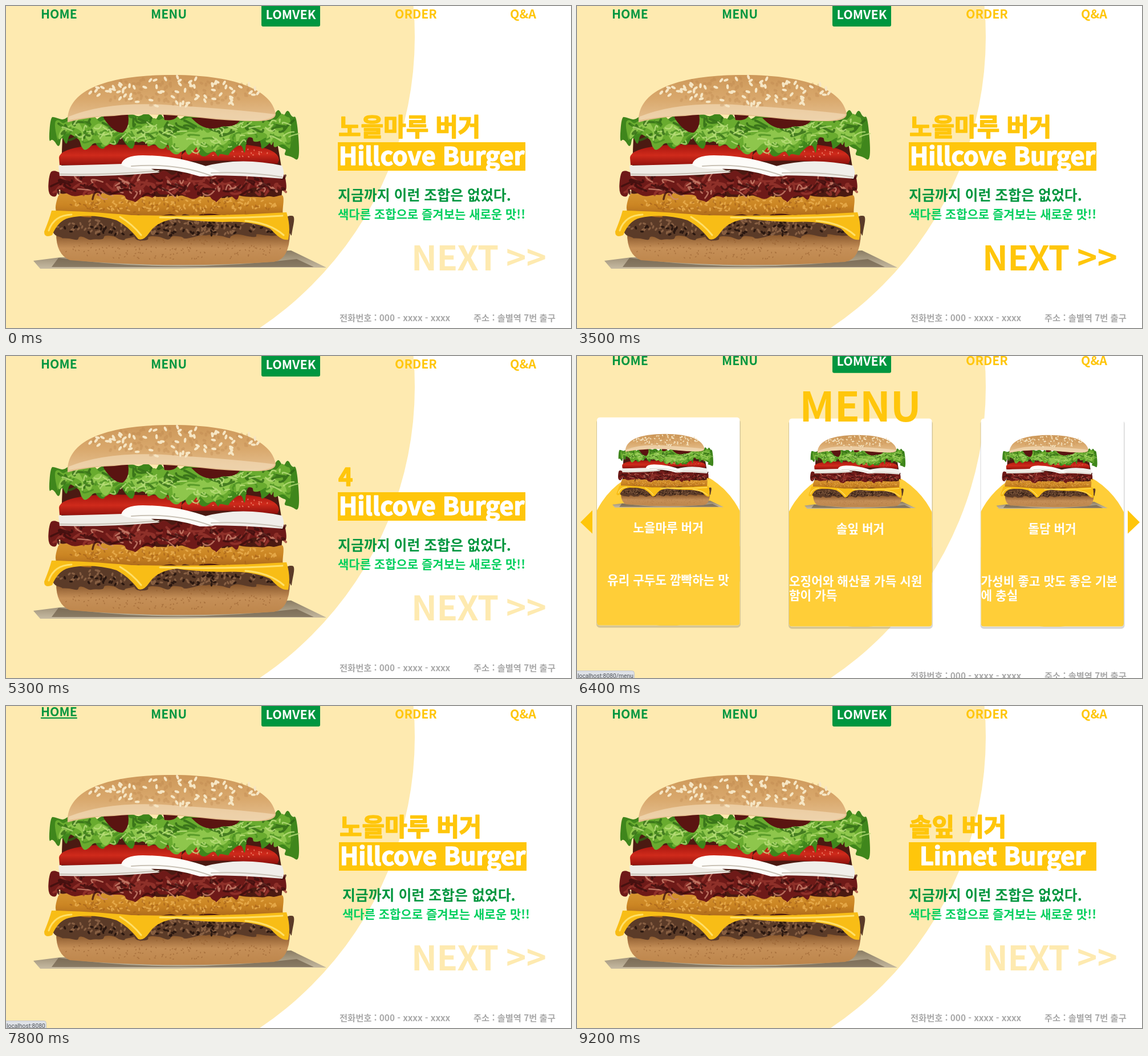
An HTML page for the animation above (9.9 s loop, 991 px wide and 565 px high).

```html
<!DOCTYPE html>
<html lang="ko">
<head>
<meta charset="utf-8">
<style>
html, body { margin: 0; width: 100%; height: 100%; overflow: hidden; background: #fff; }
svg { display: block; width: 991px; height: 565px; }
text { font-family: "Noto Sans CJK KR", "Noto Sans CJK JP", "Noto Sans CJK", sans-serif; font-weight: 700; white-space: pre; }
.nav { font-size: 21.3px; }
.title { font-size: 43px; font-weight: 900; stroke-width: 1.6px; stroke-linejoin: round; }
.gold { fill: #ffc60b; stroke: #ffc60b; }
.white { fill: #fff; stroke: #fff; }
.foot { font-size: 15.3px; font-weight: 500; fill: #a9a9a9; }
.card { font-size: 21.3px; fill: #fff; }
.tip { font: 10.3px Roboto, "Open Sans", sans-serif; fill: #50545a; }
</style>
</head>
<body>
<svg id="stage" viewBox="0 0 991 565"></svg>
<script>
const GREEN = '#00963f', GOLD = '#ffc60b', PALE = '#feeab0', LOOP = 9900;

let seed = 11;
const rnd = () => (seed = seed * 16807 % 2147483647) / 2147483647;
const spread = n => (rnd() - .5) * n;
const path = (d, fill, more = '') => `<path d="${d}" fill="${fill}" ${more}/>`;
const line = (d, color, width) => path(d, 'none', `stroke="${color}" stroke-width="${width}" stroke-linecap="round"`);
const text = (x, y, s, more = '') => `<text x="${x}" y="${y}" ${more}>${s}</text>`;
const grad = (id, ...colors) => `<linearGradient id="${id}" x2="0" y2="1">${colors.map((c, i) =>
  `<stop offset="${i / (colors.length - 1)}" stop-color="${c}"/>`).join('')}</linearGradient>`;

// Smooth closed outline through the midpoints of a point list
const blob = pts => {
  const mid = i => {
    const a = pts[i], b = pts[(i + 1) % pts.length];
    return `${((a[0] + b[0]) / 2).toFixed(1)} ${((a[1] + b[1]) / 2).toFixed(1)}`;
  };
  return `M${mid(pts.length - 1)}` + pts.map((p, i) => `Q${p[0].toFixed(1)} ${p[1].toFixed(1)} ${mid(i)}`).join('') + 'Z';
};

// Band with ragged edges between two curves
const ruffle = (x0, x1, top, bottom, amp, step = 9) => {
  const a = [], b = [];
  for (let x = x0; x <= x1; x += step) {
    a.push([x, top(x) + spread(amp)]);
    b.unshift([x + spread(step * 2), bottom(x) + spread(amp * 1.6)]);
  }
  return blob([...a, ...b]);
};

// Small ellipses scattered inside a larger one
const specks = (n, cx, cy, rx, ry, fill, w, h, o = 1) => {
  let out = '';
  while (n--) {
    const a = rnd() * 6.283, r = Math.sqrt(rnd());
    const x = cx + rx * r * Math.cos(a), y = cy + ry * r * Math.sin(a);
    out += `<ellipse rx="${w}" ry="${h}" transform="translate(${x.toFixed(1)} ${y.toFixed(1)}) rotate(${(rnd() * 180) | 0})"/>`;
  }
  return `<g fill="${fill}" opacity="${o}">${out}</g>`;
};

// Short random curved strokes
const curls = (n, x0, x1, top, bottom, len, color, w) => {
  let d = '';
  while (n--) {
    const x = x0 + rnd() * (x1 - x0), y = top(x) + rnd() * (bottom(x) - top(x));
    d += `M${x.toFixed(1)} ${y.toFixed(1)}q${spread(len).toFixed(1)} ${spread(len).toFixed(1)} ${spread(len * 2).toFixed(1)} ${spread(len).toFixed(1)}`;
  }
  return `<g opacity=".75">${line(d, color, w)}</g>`;
};

const lettuce = (x0, x1, top, bottom) => {
  const at = k => x => top(x) + (bottom(x) - top(x)) * k;
  return path(ruffle(x0, x1, top, bottom, 19, 8), '#3f861c')
    + path(ruffle(x0 + 6, x1 - 6, at(.1), at(.92), 17, 8), '#69ab2f')
    + path(ruffle(x0 + 14, x1 - 14, at(.42), at(.8), 20), '#8ec64c')
    + curls(45, x0 + 12, x1 - 12, at(.05), at(.6), 24, '#2d6513', 4)
    + curls(40, x0 + 12, x1 - 12, at(.3), at(.95), 20, '#478c1f', 3)
    + curls(65, x0 + 12, x1 - 12, at(.25), at(.95), 19, '#bfe281', 2.4);
};

const tallBurger = () =>
  path('M48 447L95 441 500 429 562 459Q420 458 300 461L60 461Z', 'url(#paper)')
  + path('M92 442Q290 470 510 444L540 458 80 458Z', '#5b4c38', 'opacity=".55"')
  + path('M100 205H470L486 300 478 405H92Z', '#4b1a12')
  + path('M88 396Q87 436 112 446Q290 461 470 449Q497 445 498 398Z', 'url(#base)')
  + specks(140, 293, 428, 190, 18, '#8d5527', 1.6, .9, .45)
  + path(ruffle(84, 508, () => 368, x => 403 + 4 * Math.sin(x / 130), 7), '#5b3b28')
  + specks(150, 295, 387, 205, 15, '#93694a', 3.2, 1.7, .8)
  + specks(80, 295, 391, 205, 13, '#2a1811', 3.2, 1.8)
  + path(ruffle(92, 492, x => 332 - 3 * Math.sin(x / 80), () => 368, 6), 'url(#fried)')
  + specks(120, 292, 347, 192, 14, '#efb556', 3.2, 1.5, .7)
  + specks(80, 292, 352, 192, 13, '#a5611a', 2.7, 1.3, .65)
  + path('M80 359Q140 360 220 367Q360 370 492 362Q500 388 495 410Q483 413 464 391Q430 376 380 379Q320 377 300 373Q265 377 252 397Q241 413 232 409Q214 386 194 376Q150 363 110 372Q91 377 81 402Q67 408 67 396Q76 374 80 359Z', '#f8bd16')
  + line('M75 394Q84 367 115 366M200 370Q222 383 237 402M420 377Q462 380 487 402M270 371Q390 374 485 368', '#ffe06a', 3)
  + path(ruffle(76, 494, () => 294, x => 332 + 5 * Math.sin(x / 26), 13), '#6e1a18')
  + curls(55, 85, 485, () => 302, () => 329, 30, '#98372f', 4)
  + curls(30, 85, 485, () => 304, () => 330, 26, '#cf8873', 2.5)
  + curls(55, 85, 485, () => 298, () => 332, 22, '#390c0c', 3.5)
  + path('M93 266Q95 246 180 243L310 245 306 276Q230 273 195 281L94 279Z', 'url(#red)')
  + path('M308 262Q320 243 400 242Q478 246 479 270L476 277Q380 268 310 273Z', 'url(#red)')
  + specks(26, 390, 257, 70, 9, '#f28a70', 1.6, 1, .8)
  + path('M92 280Q180 278 230 276L270 292Q180 300 94 298Z', '#efece6')
  + path('M345 282Q410 264 484 280Q490 294 485 303Q420 297 350 297Z', '#f1eeea')
  + path('M202 278Q206 262 240 262Q310 262 376 291Q372 300 340 299Q292 284 250 286Q212 286 202 278Z', '#fdfcf9')
  + line('M95 295Q180 297 268 289M220 281Q300 275 360 298M360 293Q420 290 484 300', '#c9c2b6', 2)
  + lettuce(78, 510, x => 193 + (x < 110 ? 10 : 0) - (x > 465 ? 5 : 0), x => 249 + 9 * Math.sin(x / 42) + (x > 460 ? (x - 460) * .3 : 0) - (x < 130 ? 16 : 0))
  + path('M170 190H214Q218 212 205 222Q190 224 172 198ZM275 186H304Q300 203 278 200ZM325 196H412Q408 213 380 211Q350 224 325 196Z', '#5a1411')
  + path('M108 204C106 150 170 121 292 121C412 121 468 152 473 190Q472 202 440 202Q390 202 340 196Q250 186 190 193Q145 194 108 204Z', 'url(#top)')
  + path('M110 194Q180 166 290 174Q410 182 472 190Q466 202 420 201Q350 196 290 190Q180 188 110 200Z', '#f6e0bf', 'opacity=".6"')
  + specks(90, 295, 150, 145, 25, '#b57d45', 3.6, 2.4, .25)
  + specks(75, 298, 151, 152, 27, '#f6e6c4', 4.4, 2.2);

const wideBurger = () =>
  `<ellipse cx="327" cy="466" rx="268" ry="66" fill="url(#shade)"/>`
  + path('M150 215Q320 190 500 215L515 395Q330 440 140 385Z', '#5a2214')
  + path('M130 386Q128 440 160 463Q230 487 325 487Q440 486 488 462Q516 438 517 390L480 400Q330 425 170 400Z', 'url(#base2)')
  + path('M131 384Q230 424 330 423Q440 418 516 388L516 402Q430 432 330 434Q220 431 131 398Z', '#efc88c')
  + path('M495 310Q500 275 535 272Q560 262 578 246Q582 258 556 281Q570 292 561 302Q590 320 608 349Q570 362 520 345Z', '#9c3a1e')
  + line('M505 293Q545 287 570 256M503 314Q560 312 600 349M510 330Q550 322 580 354', '#d9825a', 4)
  + path(ruffle(165, 542, () => 340, x => 423 - Math.abs(x - 350) * .14, 12), '#573425')
  + specks(190, 352, 382, 178, 34, '#8a6045', 5, 3, .75)
  + specks(110, 352, 386, 178, 34, '#2a160f', 4.5, 3)
  + path('M190 338Q240 324 330 331Q440 328 525 349Q508 370 500 395Q486 368 466 359Q420 345 375 345Q318 335 298 350Q285 374 268 358Q225 358 190 338Z', '#f6e4b2')
  + path('M176 372Q198 365 199 389Q193 417 180 416Q166 411 176 372ZM342 350Q372 354 369 384Q357 390 357 404Q350 438 337 429Q327 423 340 401Q334 381 342 350ZM417 361Q435 377 432 408Q421 411 417 389Z', '#57130c')
  + path('M81 390Q78 358 102 345Q91 316 108 298Q140 287 190 293Q238 300 255 324Q205 342 176 365Q130 381 81 390Z', '#a8361d')
  + line('M98 307Q150 300 232 321M94 369Q140 347 210 330M112 333Q150 321 198 317', '#dc8658', 5)
  + curls(24, 95, 220, () => 304, () => 362, 22, '#671509', 4)
  + path('M148 284Q190 264 252 271Q320 276 342 311Q325 334 270 332Q205 322 148 284Z', 'url(#fried2)')
  + path('M315 286Q390 268 500 278Q504 302 475 315Q420 329 370 319Q338 306 315 286Z', 'url(#fried2)')
  + specks(95, 330, 299, 150, 17, '#f0be72', 2.5, 1.3, .6)
  + path('M136 276Q142 246 270 244Q430 240 480 268Q490 281 450 284Q380 280 320 281Q230 270 160 290Z', 'url(#red2)')
  + line('M155 274Q260 255 460 275', '#f28564', 4)
  + lettuce(112, 542, x => x < 150 ? 214 : x > 490 ? 207 : 200, x => 241 + 8 * Math.sin(x / 38) + (x < 165 ? 32 : 0) + (x > 480 ? 16 : 0))
  + path('M140 205C143 154 210 111 320 111C438 112 506 160 508 204Q508 217 478 214Q400 203 330 203Q240 218 150 210Z', 'url(#top2)')
  + path('M143 202Q240 180 320 178Q430 182 506 204Q500 215 470 210Q400 200 330 201Q230 214 143 202Z', '#ffe7bd', 'opacity=".55"')
  + specks(110, 325, 150, 145, 31, '#a5642b', 4, 2.5, .35)
  + specks(140, 325, 149, 148, 33, '#fbe9c5', 4.1, 2.3);

const slides = [
  { ko: '노을마루 버거', en: 'Hillcove Burger' },
  { ko: '들콩 버거', en: 'Hollow Burger', x: 592, line: '지금까지 이런 치즈는 없었다.', sub: '끝없이 늘어나는 치즈의 쫄깃한 맛!!', art: 'wide' },
  { ko: '솔잎 버거', en: 'Linnet Burger' },
  { ko: '4', en: 'Hillcove Burger' }
].map(s => ({ x: 582, line: '지금까지 이런 조합은 없었다.', sub: '색다른 조합으로 즐겨보는 새로운 맛!!', art: 'tall', ...s }));

const cards = [
  [35, '노을마루 버거', '유리 구두도 깜빡하는 맛'],
  [372, '솔잎 버거', '오징어와 해산물 가득 시원', '함이 가득'],
  [708.5, '돌담 버거', '가성비 좋고 맛도 좋은 기본', '에 충실']
];

const slideMarkup = (s, i) => `<g id="slide${i}">
  <use href="#${s.art}" id="art${i}"/>
  <g id="head${i}">${text(s.x + 1, 228, s.ko, 'class="title gold"')}
    <rect x="${s.x}" y="239" width="${2 * (746.5 - s.x)}" height="50" fill="${GOLD}"/>
    ${text(746.5, 279, s.en, 'class="title white" text-anchor="middle"')}</g>
  <g id="body${i}">${text(s.x, 341, s.line, `font-size="24.9" fill="${GREEN}"`)}
    ${text(s.x, 373, s.sub, 'font-size="21" fill="#00cf5d"')}</g></g>`;

const cardMarkup = ([x, name, first, second], i) => `<g id="card${i}"><g transform="translate(${x} 116)">
  <rect y="3" x="-1" width="253" height="366" rx="6" opacity=".16"/>
  <rect width="250.5" height="365" rx="5" fill="#fff"/>
  <g clip-path="url(#face)" fill="#ffce38"><circle cx="125" cy="226" r="140"/><rect y="226" width="251" height="139"/></g>
  <use href="#tall" transform="translate(8.8 -17) scale(.38)"/>
  <g class="card">${text(125, 201, name, 'text-anchor="middle"')}
  ${second ? text(0, 293, first) + text(0, 318, second) : text(125, 293, first, 'text-anchor="middle"')}</g></g></g>`;

document.getElementById('stage').innerHTML = `<defs>
  ${grad('top', '#cd9859', '#d9a86c', '#e6c293')}${grad('top2', '#d9954e', '#dfa05c', '#f0c88c')}
  ${grad('base', '#7d4c24', '#c58f57', '#bd854b')}${grad('base2', '#e2a557', '#d58838', '#a85f1d')}
  ${grad('red', '#a5150e', '#cf2a1b', '#8e100c')}${grad('red2', '#e5502f', '#d33c20', '#a82713')}
  ${grad('fried', '#d79530', '#cb8523', '#a8661a')}${grad('fried2', '#e2ab5a', '#cc8737', '#ad6a27')}
  ${grad('paper', '#8b7d64', '#c7bba2')}
  <radialGradient id="shade"><stop offset=".5" stop-color="#29251d" stop-opacity=".95"/>
  <stop offset=".8" stop-color="#29251d" stop-opacity=".5"/><stop offset="1" stop-color="#29251d" stop-opacity="0"/></radialGradient>
  <clipPath id="face"><rect width="250.5" height="365" rx="5"/></clipPath>
  <g id="tall">${tallBurger()}</g><g id="wide">${wideBurger()}</g></defs>
  <rect width="991" height="565" fill="#fff"/>
  <circle cx="101" cy="54" r="616" fill="${PALE}"/>
  <g id="home">${slides.map(slideMarkup).join('')}
    <g id="next" font-size="60">${text(711, 464, 'NEXT', 'letter-spacing="-.8"')}${text(877, 464, '&gt;&gt;')}</g></g>
  <g id="menu">${cards.map(cardMarkup).join('')}
    ${text(497, 121, 'MENU', `font-size="72" fill="${GOLD}" text-anchor="middle"`)}
    ${path('M27 277V318L6 298ZM966 277V318L987 298Z', GOLD)}</g>
  <g id="bar"><rect x="448" y="-8" width="103" height="44" rx="3" fill="${GREEN}"/>
    ${text(499.5, 23, 'LOMVEK', 'font-size="21.5" fill="#fff" text-anchor="middle"')}
    <g class="nav">${text(61, 22, 'HOME', `id="homeLink" fill="${GREEN}"`)}${text(254, 22, 'MENU', `id="menuLink" fill="${GREEN}"`)}
    ${text(682, 22, 'ORDER', `fill="${GOLD}"`)}${text(884, 22, 'Q&amp;A', `fill="${GOLD}"`)}</g></g>
  <g id="foot" class="foot">${text(585, 553, '전화번호 : 000 - xxxx - xxxx')}${text(820, 553, '주소 : 솔별역 7번 출구')}</g>
  <g id="tip"><rect id="tipBox" x="-5" y="552.5" height="20" rx="4" fill="#dee1e6" stroke="#c3c6ca"/>
    ${text(1, 564.5, '', 'id="tipText" class="tip"')}</g>`;

const el = id => document.getElementById(id);
const set = (id, attrs) => { for (const k in attrs) el(id).setAttribute(k, attrs[k]); };
const move = (id, x, y, opacity = 1) => set(id, { transform: `translate(${x} ${y})`, opacity });
const show = (id, on) => set(id, { display: on ? 'inline' : 'none' });
const within = (t, ...spans) => spans.some(([a, b]) => t >= a && t < b);
const clamp = v => Math.max(0, Math.min(1, v));
const ramp = (t, start, dur = 270) => { const p = clamp((t - start) / dur); return p * p * (3 - 2 * p); };

// Remaining distance and opacity of an entering part
const enter = (age, dur) => {
  const p = clamp(age / dur);
  return [24 * (1 - p) ** 3, Math.min(1, p * 4)];
};

// Start time and slide index
const cues = [[-2000, 0], [950, 0], [3650, 1], [4150, 2], [4750, 3], [7575, 0], [8350, 1], [8720, 2]];
const tips = [[1700, 3250], [5600, 6700], [7300, 8350]];

function hover(id, on) {
  set(id, { y: on ? 18 : 22, 'text-decoration': on ? 'underline' : 'none' });
}

function draw(t) {
  const onMenu = within(t, [5680, 7575]);
  show('home', !onMenu);
  show('menu', onMenu);

  const [start, current] = cues.filter(c => c[0] <= t).pop(), age = t - start;
  slides.forEach((s, i) => show('slide' + i, i === current));
  const [artY, artO] = enter(age, 250), [headX, headO] = enter(age, 400), [bodyX, bodyO] = enter(age - 102, 400);
  move('art' + current, 0, artY, artO);
  move('head' + current, headX, 0, headO);
  move('body' + current, bodyX, 0, bodyO);
  set('next', { fill: within(t, [3500, 5250], [8300, 9150]) ? GOLD : PALE });

  const scroll = 20 * (ramp(t, 6300) - ramp(t, 6930));
  const [rise, fade] = enter(t - 5680, 400);
  cards.forEach((c, i) => {
    const lift = 6 * (ramp(t, 6300 + 250 * i) - ramp(t, 6600 + 250 * i));
    move('card' + i, 0, rise - lift, fade);
  });
  move('menu', 0, -scroll);
  move('bar', 0, -scroll);
  move('foot', 0, onMenu ? 20 - scroll : 0);

  hover('homeLink', within(t, [1700, 2600], [7300, 8200]));
  hover('menuLink', within(t, [5600, 6300]));

  const tip = tips.find(([a, b]) => t >= a && t < b);
  show('tip', tip);
  if (tip) {
    const deep = within(t, [2900, 6700]);
    set('tip', { opacity: clamp(Math.min((t - tip[0] + 60) / 200, (tip[1] - t) / 250)) });
    set('tipBox', { width: deep ? 105.5 : 75.5 });
    el('tipText').textContent = 'localhost:8080' + (deep ? '/menu' : '');
  }
}

const begin = performance.now();
function tick() {
  draw((performance.now() - begin) % LOOP);
  requestAnimationFrame(tick);
}
tick();
</script>
</body>
</html>
```
